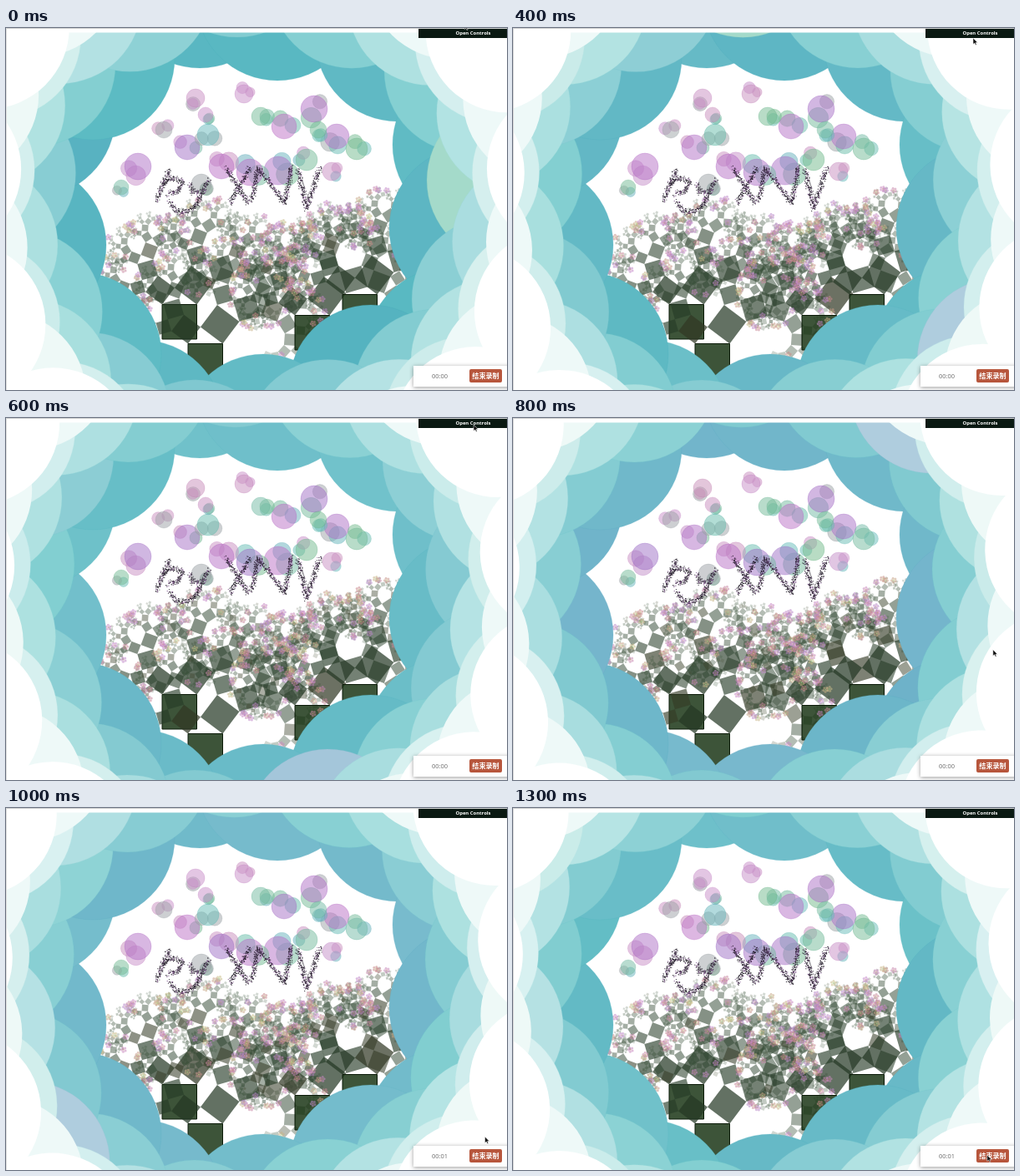
Recreate the animation shown at these times as an HTML page with a canvas. Size 600 by 434 pixels, loop 1400 ms.

```html
<!DOCTYPE html>
<html lang="zh">
<head>
<meta charset="utf-8">
<title>Cloud garden</title>
<style>
  html, body { margin: 0; width: 600px; height: 434px; overflow: hidden; background: #fff; }
  #stage { position: relative; width: 600px; height: 434px; overflow: hidden; }
  #stage > * { position: absolute; }
  .edge { left: 0; top: 0; width: 600px; height: 434px; box-sizing: border-box;
    border-top: 1px solid #cfd0d0; border-left: 1px solid #dedede; }
  .controls { left: 494px; top: 1px; width: 106px; height: 11px; background: #0a1912; color: #fff;
    font: bold 5.9px/11px "Open Sans", sans-serif; text-align: center; text-indent: 25px; white-space: nowrap; }
  .panel { left: 488px; top: 405px; width: 116px; height: 25px; background: #fff;
    box-shadow: 0 1px 5px rgba(0,0,0,.4); }
  .time { position: absolute; left: 0; width: 63px; text-align: center; color: #666;
    font: 7.4px/24px "Open Sans", sans-serif; }
  .stop { position: absolute; left: 67px; top: 4px; width: 39px; height: 16px; border-radius: 2px;
    background: #b7563c; color: #fff; text-align: center; white-space: nowrap;
    font: bold 8.1px/15px "Noto Sans CJK SC", "Noto Sans CJK", sans-serif; }
  #cursor { left: 0; top: 0; overflow: visible; }
</style>
</head>
<body>
<div id="stage">
  <canvas id="art" width="600" height="434"></canvas>
  <div class="edge"></div>
  <div class="controls">Open Controls</div>
  <div class="panel"><span class="time" id="time">00:00</span><span class="stop">结束录制</span></div>
  <svg id="cursor" width="8" height="10"><path d="M0 0V7.5L1.8 6L3 8.6L4.2 8L3.1 5.6H5.4Z" fill="#111" stroke="#fff" stroke-width=".5"/></svg>
</div>
<script>
const LOOP = 1400, STEP = 100, TAU = Math.PI * 2;
const ctx = document.getElementById('art').getContext('2d');
const cursor = document.getElementById('cursor');
const clock = document.getElementById('time');

const hash = (a, b = 0, c = 0) => {
  const v = Math.sin(a * 12.9898 + b * 78.233 + c * 37.719 + 4.1) * 43758.5453;
  return v - Math.floor(v);
};
const jitter = (a, b, c) => hash(a, b, c) - 0.5;
const hsl = (h, s, l, a = 1) => `hsla(${h},${s}%,${l}%,${a})`;
function disc(x, y, r, fill, stroke) {
  ctx.beginPath();
  ctx.arc(x, y, r, 0, TAU);
  ctx.fillStyle = fill;
  ctx.fill();
  if (stroke) { ctx.strokeStyle = stroke; ctx.stroke(); }
}

// Clouds: each ring sits in the gaps of the ring inside it, a little further out
const MID = { x: 290, y: 235 }, RINGS = 6, PUFF = 98;
const opening = [[232,-50],[325,-35],[469,14],[561,140],[557,240],[530,385],[437,430],
  [308,489],[162,472],[88,391],[22,260],[33,105],[104,36]];
const rings = [opening.map(([x, y]) => [x - MID.x, y - MID.y])];
for (let k = 1; k < RINGS; k++) {
  const grow = 1.19 - 0.03 * k;
  rings.push(rings[k - 1].map(([x, y], i, ring) => {
    const [nx, ny] = ring[(i + 1) % ring.length];
    return [(x + nx) / 2 * grow, (y + ny) / 2 * grow];
  }));
}

function cloudColor(step, sway, k, i) {
  const inner = k === 0;
  const bluish = 8 * Math.exp(-(((step - 8.7) / 1.8) ** 2));
  const light = 100 - 44 * (1 - k / 5) ** 1.4 + (inner ? 6 * sway : 0);
  const n = hash(step, k, i);
  if (k > 0 && k < 3 && n > 0.93) return [n > 0.965 ? 202 : 162, 42, 72 + 3 * k];
  return [187 - 3 * k + (inner ? bluish : 0) + 5 * jitter(step, k, i), 46,
    light + (k < 4 ? 4 * jitter(i, step, k) : 0)];
}

function drawClouds(step) {
  const sway = (1 - Math.cos(TAU * step * STEP / 1800)) / 2;
  ctx.lineWidth = 0.6;
  rings.forEach((ring, k) => {
    const pull = sway * k / 5;
    ctx.save();
    ctx.translate(MID.x - 9 * pull, MID.y);
    ctx.rotate(-0.028 * pull);
    ring.forEach(([x, y], i) => {
      const [h, s, l] = cloudColor(step, sway, k, i);
      disc(x, y, PUFF, hsl(h, s, l), k < 4 ? hsl(h, s, l - 6, 0.4) : '');
    });
    ctx.restore();
  });
}

// Bubbles: a few anchors, each with smaller companions
const anchors = [[158,166,16],[217,143,15],[242,128,13],[227,84,11],[285,79,11],[239,104,9],[189,122,10],
  [369,97,16],[333,118,15],[305,106,11],[396,130,15],[420,145,13],[360,158,13],[326,171,17],[292,173,16],
  [258,166,15],[234,187,12],[138,191,9],[374,122,10],[390,172,11]];
const tints = [[178,38,58], [305,35,68], [152,34,60], [200,5,64]];
function drawBubble(x, y, r, id, step) {
  const [h, s, l] = r >= 14 ? [284, 42, 62] : tints[Math.floor(hash(id, 8) * tints.length)];
  const hue = h + 24 * jitter(step, id, 2);
  disc(x, y, r, hsl(hue, s, l, 0.52), hsl(hue, s, l - 8, 0.35));
}
function drawBubbles(step) {
  ctx.lineWidth = 0.7;
  anchors.forEach(([x, y, r], i) => {
    for (let j = 1; j < 3; j++) {
      const a = hash(i, j) * TAU;
      drawBubble(x + Math.cos(a) * r * 0.7, y + Math.sin(a) * r * 0.7, r * (0.5 + 0.3 * hash(j, i)), i * 3 + j, step);
    }
    drawBubble(x, y, r, i * 3, step);
  });
}

// Stippled handwriting
const strokes = [
  [196,170,180,207], [187,186,200,180,212,184,206,196,194,199],
  [196,208,204,220,216,221,228,213,242,182], [221,187,224,197,232,196],
  [264,168,290,210], [292,168,268,210],
  [294,208,302,168,334,210,342,166], [350,170,360,216,376,168]
];
function drawWriting() {
  strokes.forEach((p, k) => {
    for (let j = 0; j + 3 < p.length; j += 2) {
      const dx = p[j + 2] - p[j], dy = p[j + 3] - p[j + 1];
      const count = Math.hypot(dx, dy) * 3.4;
      for (let i = 0; i < count; i++) {
        const u = i / count, id = k * 10 + j;
        const x = p[j] + dx * u + (jitter(i, id, 1) + jitter(i, id, 2)) * 4;
        const y = p[j + 1] + dy * u + (jitter(i, id, 3) + jitter(i, id, 4)) * 4;
        disc(x, y, 0.62, hash(i, id, 5) < 0.75 ? 'rgba(30,24,36,.85)' : 'rgba(110,60,125,.8)');
      }
    }
  });
}

// Trees of squares on 3-4-5 triangles
const LEFT = -Math.acos(0.6), RIGHT = Math.acos(0.8), DEPTH = 8, TRUNK = 41.5;
const trunks = [[187,373],[218,420],[346,386],[403,361]];
let leaves;
function drawTree(x, y, side, angle, depth, step, id) {
  const c = Math.cos(angle) * side, s = Math.sin(angle) * side;
  const tx = x + s, ty = y - c;
  ctx.beginPath();
  ctx.moveTo(x, y);
  ctx.lineTo(x + c, y + s);
  ctx.lineTo(tx + c, ty + s);
  ctx.lineTo(tx, ty);
  ctx.closePath();
  const olive = depth > 0 && hash(step, depth, id % 3) > 0.85;
  ctx.fillStyle = depth ? hsl(olive ? 80 : 122, 22, 17 + depth, 0.78 - depth * 0.07) : 'rgba(25,52,20,.84)';
  ctx.fill();
  if (depth === 0) { ctx.strokeStyle = '#0b1a08'; ctx.lineWidth = 1; ctx.stroke(); }
  if (depth >= 6 && hash(id, depth, 7) < 0.24) leaves.push([tx + c / 2, ty + s / 2, id]);
  if (depth === DEPTH || side < 3.2) return;
  const la = angle + LEFT, ls = side * 0.6;
  drawTree(tx, ty, ls, la, depth + 1, step, id * 2);
  drawTree(tx + Math.cos(la) * ls, ty + Math.sin(la) * ls, side * 0.8, angle + RIGHT, depth + 1, step, id * 2 + 1);
}
function drawFlower(x, y, id, step) {
  const hue = 285 + 130 * hash(id, 3, step) ** 1.6;
  const turn = hash(id, 9) * TAU;
  for (let i = 0; i < 5; i++) {
    const a = turn + i * TAU / 5;
    disc(x + Math.cos(a) * 2.5, y + Math.sin(a) * 2.5, 1.5, hsl(hue, 36, 66, 0.55));
  }
  disc(x, y, 0.9, hsl(hue + 40, 50, 70, 0.7));
}
function drawGarden(step) {
  leaves = [];
  trunks.forEach(([x, y], i) => drawTree(x, y, TRUNK, 0, 0, step, i + 5));
  leaves.forEach(([x, y, id]) => drawFlower(x, y, id, step));
}

// time, x, y of the pointer tip
const path = [[0,549,-6],[300,550,-6],[400,551,12],[600,560,8],[900,580,372],[1100,567,416],[LOOP,568,416]];
function placeCursor(t) {
  const i = path.findIndex(p => p[0] > t);
  const [t0, x0, y0] = path[i - 1], [t1, x1, y1] = path[i];
  const u = (t - t0) / (t1 - t0), e = u * u * (3 - 2 * u);
  cursor.style.transform = `translate(${x0 + (x1 - x0) * e}px,${y0 + (y1 - y0) * e}px)`;
}

let shown = -1;
function render(t) {
  const step = Math.floor(t / STEP);
  if (step === shown) return;
  shown = step;
  ctx.fillStyle = '#fff';
  ctx.fillRect(0, 0, 600, 434);
  drawBubbles(step);
  drawGarden(step);
  drawWriting();
  drawClouds(step);
  ctx.fillStyle = '#fff';
  ctx.fillRect(0, 0, 600, 5.5);
  placeCursor(step * STEP);
  clock.textContent = step < 10 ? '00:00' : '00:01';
}

const start = performance.now();
function tick() {
  render((performance.now() - start) % LOOP);
  requestAnimationFrame(tick);
}
tick();
</script>
</body>
</html>
```
